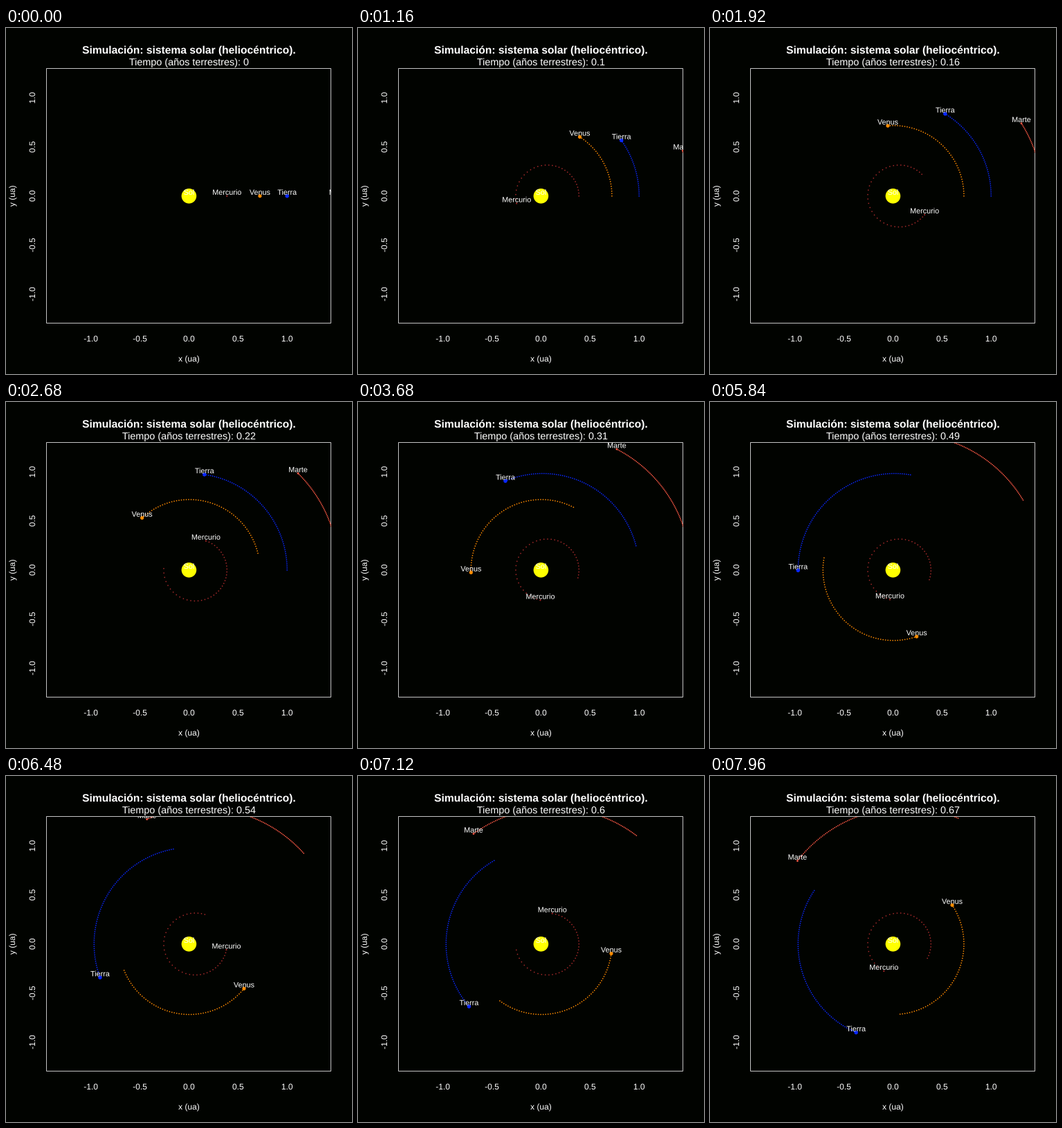
A matplotlib script that plays this animation: 500x500 px, repeating every 8 s.

```python
import numpy as np
import matplotlib.pyplot as plt
from matplotlib.animation import FuncAnimation
from matplotlib.colors import to_rgba
from matplotlib.patches import PathPatch, Rectangle
from matplotlib.textpath import TextPath, text_to_path
from matplotlib.transforms import Affine2D

SIZE, DPI = 500, 100
PX = 72 / DPI                 # points per pixel
FRAMES, INTERVAL = 200, 40
STEP = 1 / 299                # years per frame
CX, CY, AU = 264.4, 242.8, 141.79
LABEL_UP = 1.8                # label baseline above the body
DOT = 0.85                    # trail dot radius

# name, aphelion, eccentricity, colour, body radius, trail length
PLANETS = [
    ("Mercurio", 0.387, 0.2015, "#a52a2a", 1.0, 40),
    ("Venus", 0.723, 0.0068, "#ff8c00", 2.6, 60),
    ("Tierra", 1.000, 0.0167, "#0a28ff", 2.75, 80),
    ("Marte", 1.524, 0.0934, "#ff5a46", 1.4, 100),
]


def orbit(aphelion, ecc):
    """Pixel positions for every frame, starting at aphelion on the x axis."""
    a = aphelion / (1 + ecc)
    mean = 2 * np.pi * np.arange(FRAMES) * STEP / a ** 1.5 + np.pi
    anom = mean.copy()
    for _ in range(12):
        anom -= (anom - ecc * np.sin(anom) - mean) / (1 - ecc * np.cos(anom))
    x = -a * (np.cos(anom) - ecc)
    y = -a * np.sqrt(1 - ecc ** 2) * np.sin(anom)
    return np.column_stack([CX + AU * x, CY - AU * y])


fig = plt.figure(figsize=(SIZE / DPI, SIZE / DPI), dpi=DPI, facecolor="#010300")
ax = fig.add_axes([0, 0, 1, 1])
ax.set_xlim(0, SIZE)
ax.set_ylim(SIZE, 0)
ax.axis("off")


class Caption:
    """Centred text placed by its baseline at fractional pixels."""

    def __init__(self, x, y, text, size, weight="normal", angle=0, clip=None):
        self.font = plt.Text(family="Liberation Sans", weight=weight,
                             size=size).get_fontproperties()
        self.angle = angle
        self.patch = PathPatch(TextPath((0, 0), " "), facecolor="white",
                               linewidth=0, snap=False, zorder=3)
        ax.add_artist(self.patch)
        if clip is not None:
            self.patch.set_clip_path(clip)
        self.set_text(text)
        self.move(x, y)

    def set_text(self, text):
        width = text_to_path.get_text_width_height_descent(
            text, self.font, False)[0]
        self.patch.set_path(TextPath((-width / 2, 0), text, prop=self.font))

    def move(self, x, y):
        place = Affine2D().scale(1, -1).rotate_deg(-self.angle).translate(x, y)
        self.patch.set_transform(place + ax.transData)


box = Rectangle((58.5, 58.5), 411, 368, fill=False, edgecolor="#c4c4c4",
                linewidth=PX, snap=False, zorder=1)
ax.add_patch(box)

Caption(CX, 37, "Simulación: sistema solar (heliocéntrico).", 15.6, "bold")
clock = Caption(CX, 54, "0", 14.4)
for v in (-1.0, -0.5, 0.0, 0.5, 1.0):
    Caption(CX + AU * v, 453, f"{v:.1f}", 12)
    Caption(42, CY - AU * v, f"{v:.1f}", 12, angle=90)
Caption(CX, 482, "x (ua)", 12)
Caption(13, CY, "y (ua)", 12, angle=90)

dots = ax.scatter([], [], linewidths=0, zorder=2)
dots.set_clip_path(box)

Caption(CX, CY - LABEL_UP, "Sol", 10.8, clip=box)
labels = [Caption(CX, CY, p[0], 10.8, clip=box) for p in PLANETS]
paths = [orbit(*p[1:3]) for p in PLANETS]


def draw(n):
    points, radii, colors = [(CX, CY)], [10.8], [to_rgba("yellow")]
    for planet, path, label in zip(PLANETS, paths, labels):
        color, body, length = planet[3:]
        trail = path[max(0, n - length):n + 1]
        points += [*trail, path[n]]
        radii += [DOT] * len(trail) + [body]
        colors += [to_rgba(color)] * (len(trail) + 1)
        x, y = path[n]
        label.move(x, y - LABEL_UP)
    dots.set_offsets(np.array(points))
    dots.set_sizes((2 * PX * np.array(radii)) ** 2)
    dots.set_facecolors(colors)
    clock.set_text(f"Tiempo (años terrestres): {round(n * STEP, 2):g}")
    return [dots, clock.patch, *(label.patch for label in labels)]


anim = FuncAnimation(fig, draw, frames=FRAMES, interval=INTERVAL,
                     init_func=lambda: draw(0), repeat=True, repeat_delay=0)
plt.show()
```
